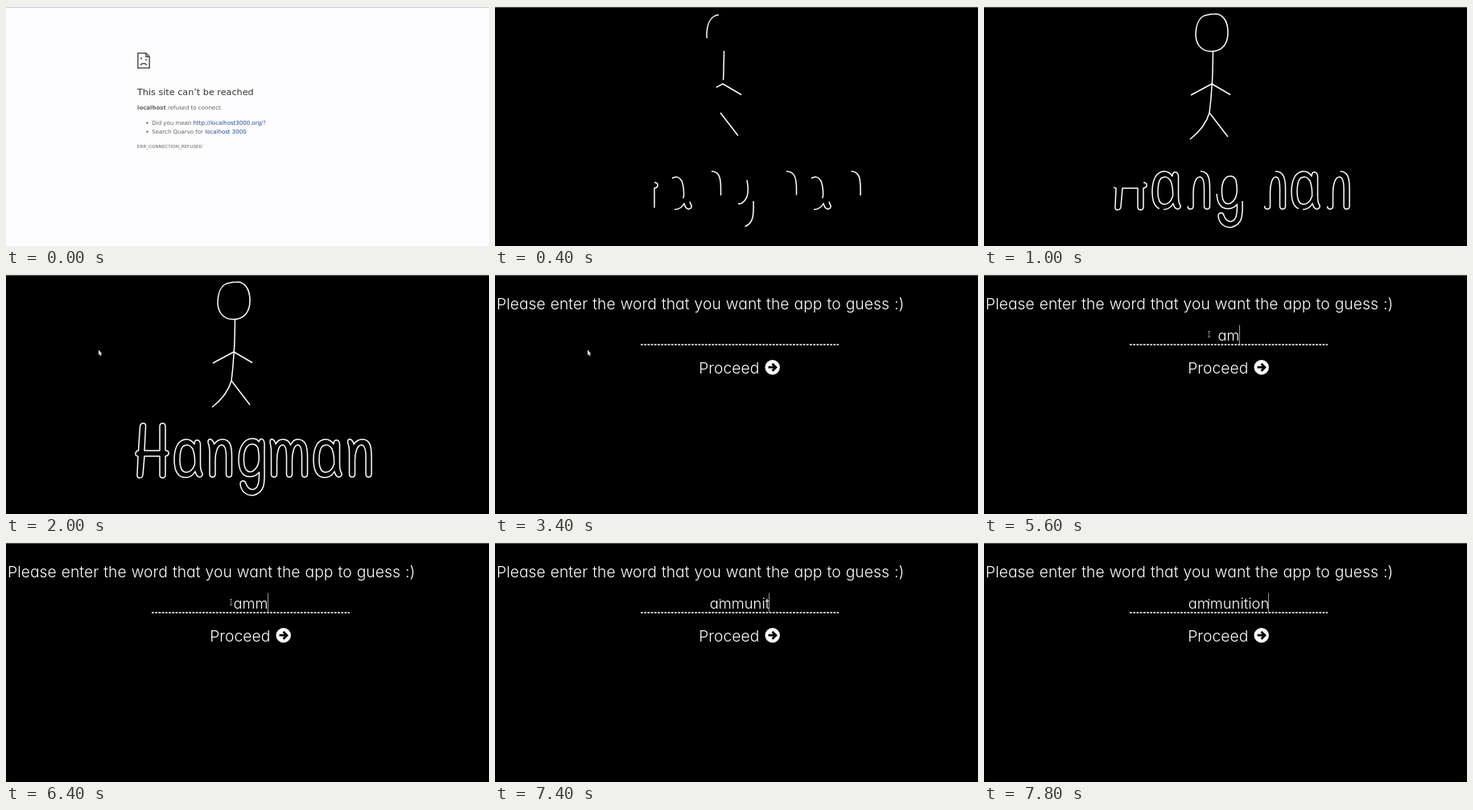
Write an HTML page that moves like this. It is 600 px wide and 299 px high and loops after 8000 ms.

```html
<!DOCTYPE html>
<html lang="en">
<head>
<meta charset="utf-8">
<title>Hangman</title>
<style>
html, body { margin: 0; height: 100%; overflow: hidden; background: #000; }
svg { display: block; width: 100vw; height: 100vh; }
#error { font: 7px "DejaVu Sans", sans-serif; fill: #646464; }
#error .link { fill: #1f4b8e; }
#sketch { fill: none; stroke: #fff; stroke-width: 1.5; stroke-linejoin: round; }
#prompt {
  font: 300 19.25px Inter, sans-serif; fill: #fff;
  letter-spacing: .05px; word-spacing: .6px;
  font-feature-settings: "cv11"; font-optical-sizing: none;
}
#word { font-size: 18.3px; text-anchor: middle; }
</style>
</head>
<body>
<svg viewBox="0 0 600 299">
  <g id="error">
    <rect width="600" height="299" fill="#fdfcff"/>
    <rect y="1" width="600" height="1" fill="#c4c4c6"/>
    <g fill="none" stroke="#555" stroke-width="1.5">
      <path d="M163.8 58.8H174L178.2 63V77.2H163.8ZM173.8 59V63.3H178"/>
      <path d="M168 64v2.6M174 66v2M167.3 73.8Q168 71.5 171 71.5T174.7 73.8"/>
    </g>
    <text x="163" y="110.5" font-size="11.2" fill="#333">This site can’t be reached</text>
    <text x="163" y="129.3"><tspan font-weight="bold">localhost</tspan> refused to connect.</text>
    <circle cx="175.5" cy="145.6" r="1.2"/>
    <text x="181.3" y="147.8">Did you mean <tspan class="link">http://localhost3000.org/</tspan>?</text>
    <circle cx="175.5" cy="156.6" r="1.2"/>
    <text x="181.3" y="158.8">Search Quarvo for <tspan class="link">localhost 3000</tspan></text>
    <text x="163" y="176.8" font-size="5.6">ERR_CONNECTION_REFUSED</text>
  </g>

  <g id="sketch">
    <path d="M278 11C268 12 263 22 263 37C264 50 272 57 283 56.5C297 56 303 46 303 33C303 18 296 9 286 10Q281 10.2 278 11Z"/>
    <path d="M284.5 56Q284 92 283 100Q282 118 280 133Q275 151 256 166"/>
    <path d="M306 110.5L283 97L257 111"/>
    <path d="M280 133L303 163"/>
    <path d="M198 220c5-1 6 6 0 7V250q0 4-3.5 4t-3.5-4V227H172L170 250q-.5 4-4 4t-3-4L164 227q-3.5 0-3-3.5t3.5-3.5L166.5 190q.5-4 4-4t3 4L172 220H191V190q0-4 3.5-4t3.5 4Z"/>
    <g id="a">
      <path d="M223 253.5Q231 253.5 235 246Q237 253.5 241 253Q246 251.5 243 246.5Q241.5 244 241.5 236V212Q241 207 237.5 207Q234 207 234 212Q230 206 224 206C214 206 209 217 209 231C209 245 213 253.5 223 253.5Z"/>
      <path d="M220 214.5Q227 210 232 218Q235 226 234.5 237Q231 247 224 247Q216 247 216 231Q216 219 220 214.5Z"/>
    </g>
    <path id="n" d="M269 206C279 206 280.5 215 280.5 228V249q0 4-3.5 4t-3.5-4V228C273.5 218 272 213 268 213C263 213 260 222 260 232V249q0 4-3.5 4t-3.5-4V220C253 214 251 212 251 209C251 204 257 205 258.5 212Q263 206 269 206Z"/>
    <path d="M313 217C315 228 316 240 306 246Q296 249 295.5 232C295 218 300 212 306 212Q311 212 313 217Z"/>
    <path d="M321 243C321.5 262 321 272 308 275.5C298 277 292 270 291 262C291 257 297 256 298 261Q301 269 307 268.5C314 267 314.5 258 314.5 247Q310 252.5 303 252.5C293 252.5 289 243 289 231C289 214 297 205 306 205Q312 205 314 209Q316 204 319 206Q321.5 208 321 215Z"/>
    <path d="M362 206C372 206 374.5 214 374.5 228V249q0 4-3.5 4t-3.5-4V228C367.5 218 366 213 362.5 213C358 213 355.5 222 355.5 232V249q0 4-3.5 4t-3.5-4V228C348.5 218 347 213 343.5 213C339 213 336.5 222 336.5 232V249q0 4-3.5 4t-3.5-4V220C329.5 214 328 212 328 209C328 204 333.5 205 335 212Q338 206 344 206Q351 206 353.5 213Q357 206 362 206Z"/>
    <use href="#a" x="173"/>
    <use href="#n" x="173.5"/>
  </g>

  <g id="prompt">
    <text x="2" y="43.6">Please enter the word that you want the app to guess :)</text>
    <path d="M181 88H427" stroke="#fff" stroke-width="1.6" stroke-dasharray="2.9 1.3"/>
    <text id="word" x="304" y="83"></text>
    <rect id="caret" y="63.5" width="1" height="23.5" fill="#999"/>
    <text x="253.2" y="123.7">Proceed</text>
    <circle cx="344.7" cy="116.2" r="9.2"/>
    <path d="M339.5 116.2h9M344.5 111.7l4.5 4.5-4.5 4.5" fill="none" stroke="#000" stroke-width="2.7"/>
  </g>

  <rect id="bar" width="600" height="1.5" fill="#f2f2f2"/>
  <path id="arrow" d="M0 0V6.6L1.4 5.3L2.5 7.8L3.6 7.3L2.6 5H4.4Z" fill="#eee"/>
  <path id="beam" d="M-1.5 -3.5H1.5M0 -3.5V3.5M-1.5 3.5H1.5" fill="none" stroke="#999" stroke-width=".8"/>
</svg>
<script>
const el = id => document.getElementById(id);
const show = (id, on) => el(id).style.display = on ? "" : "none";
const place = (id, x, y) => el(id).setAttribute("transform", `translate(${x} ${y})`);

const LOOP = 8000, STEP = 200;
// time and number of letters typed
const typed = [[5400, 1], [5600, 2], [5800, 3], [6600, 4], [6800, 5], [7400, 7], [7600, 9], [7800, 10]];

function draw(now) {
  const t = Math.floor(now % LOOP / STEP) * STEP;
  const inPrompt = t >= 3400;
  show("error", t < 400);
  show("bar", t >= 400);
  show("sketch", t >= 400 && !inPrompt);
  show("prompt", inPrompt);

  // every outline grows at the same speed
  const drawn = t >= 2000 ? 999 : 36 + 0.19 * (t - 400);
  el("sketch").setAttribute("stroke-dasharray", `${drawn} 999`);

  const k = Math.min(1, Math.max(0, (t - 3600) / 1200));
  const x = 115 + 164.5 * k, y = 94.5 - 19.5 * k;
  const overInput = x > 181 && y < 88;
  show("arrow", t >= 1600 && !overInput);
  show("beam", overInput);
  place("arrow", x, y);
  place("beam", x, y);

  const count = typed.reduce((n, [at, letters]) => t >= at ? letters : n, 0);
  const word = el("word");
  word.textContent = "ammunition".slice(0, count);
  const width = count ? word.getComputedTextLength() : 0;
  el("caret").setAttribute("x", Math.floor(303.5 + width / 2));
  show("caret", t >= 4800 && !(t >= 6000 && t < 6400));
}

const start = performance.now();
function tick() {
  draw(performance.now() - start);
  requestAnimationFrame(tick);
}
tick();
</script>
</body>
</html>
```
